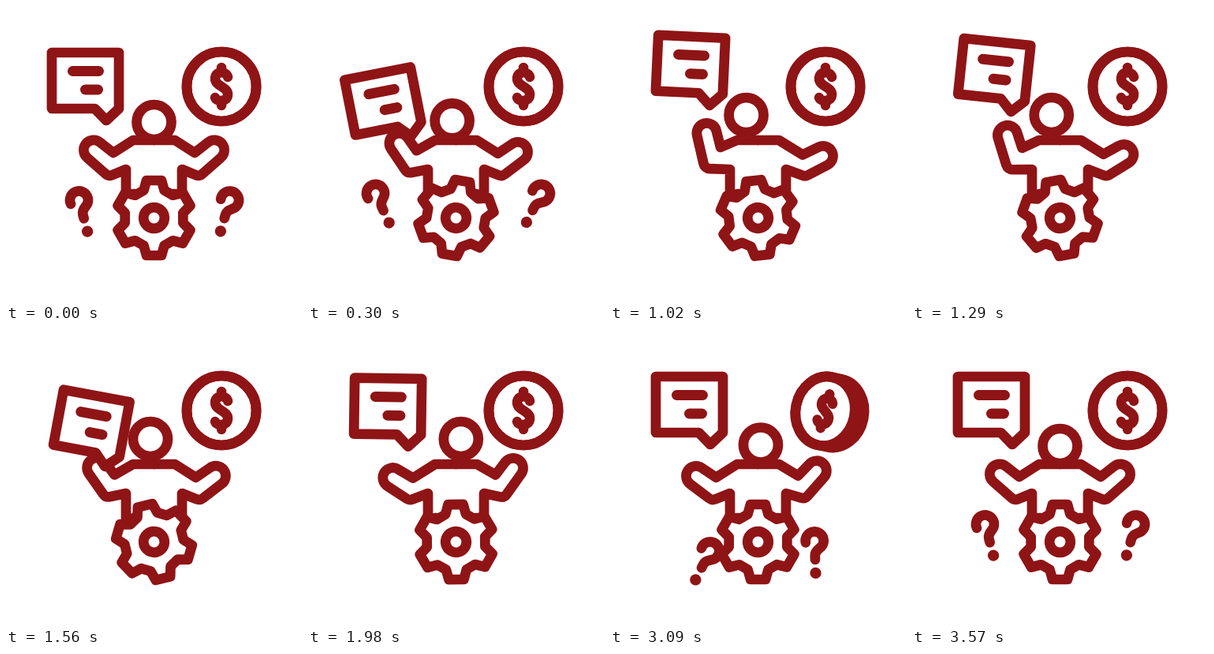
Write an HTML page with a canvas that moves like this. It is 375 px wide and 375 px high and loops after 3.6 s.

```html
<!DOCTYPE html>
<html>
<head>
<meta charset="utf-8">
<style>
html, body { margin: 0; width: 100%; height: 100%; overflow: hidden; background: #fff; }
canvas { display: block; }
</style>
</head>
<body>
<canvas id="stage" width="375" height="375"></canvas>
<script>
const ctx = document.getElementById('stage').getContext('2d');
const LOOP = 3600, RED = '#8f1416', RAD = Math.PI / 180, LINE = 12.7;

const mix = (a, b, k) => a.map((v, i) => v + (b[i] - v) * k);

// Smooth 0 to 1 between two times.
function ease(t, start, end) {
  const u = Math.min(1, Math.max(0, (t - start) / (end - start)));
  return u * u * (3 - 2 * u);
}

function ink(width = LINE, filled = false) {
  if (filled) ctx.fill();
  ctx.lineWidth = width;
  ctx.stroke();
}

function poly(points, closed) {
  ctx.beginPath();
  points.forEach(p => ctx.lineTo(...p));
  if (closed) ctx.closePath();
}

function circle(x, y, r) {
  ctx.beginPath();
  ctx.arc(x, y, r, 0, 2 * Math.PI);
}

function placed(x, y, degrees, draw) {
  ctx.save();
  ctx.translate(x, y);
  ctx.rotate(degrees * RAD);
  draw();
  ctx.restore();
}

function question(x, y, degrees, scale) {
  if (scale < 0.01) return;
  placed(x, y, degrees, () => {
    ctx.scale(scale, scale);
    ctx.beginPath();
    ctx.arc(0, 0, 11.5, 170 * RAD, 35 * RAD);
    ctx.bezierCurveTo(6, 11, 0, 12, 0, 19);
    ctx.lineTo(0, 24);
    ink();
    circle(0, 41, 0.8);
    ink();
  });
}

function questions(t) {
  const leaving = t < LOOP / 2;
  const out = leaving ? 1.18 * ease(t, 0, 800) : 0;
  const back = leaving ? 0 : 1 - ease(t, 2760, 3420);
  const scale = leaving ? 1 - ease(t, 690, 900) : ease(t, 2760, 2960);
  question(92.5 - 18.5 * out + 69 * back, 246 - 23 * out + 68 * back, -15 - 26 * out + 84 * back, scale);
  question(283.5 + 31.5 * out - 49 * back, 246 - 23 * out + 42 * back, 16.5 + 27.5 * out - 37 * back, scale);
}

// Each pose: hand, inner elbow, outer elbow.
const REST = [111, 182.5, 136, 186, 130, 216];
const RAISED = [122.5, 161, 140, 179, 120, 206];
const LOWERED = [104, 191.5, 130, 189, 127, 216];

function halfBody(lift) {
  const [hx, hy, ix, iy, ox, oy] = mix(REST, lift < 0 ? LOWERED : RAISED, Math.abs(lift));
  const dir = Math.atan2(hy - (iy + oy) / 2, hx - (ix + ox) / 2);
  ctx.beginPath();
  ctx.moveTo(187.5, 170);
  ctx.lineTo(161, 170);
  ctx.lineTo(ix, iy);
  ctx.arc(hx, hy, 12.6, dir + Math.PI / 2, dir - Math.PI / 2, true);
  ctx.arcTo(ox, oy, 152, 207, 8);
  ctx.lineTo(152, 207);
  ctx.lineTo(152, 241);
  ctx.lineTo(163, 238);
  ink();
}

function body(left, right) {
  ctx.fillRect(152, 170, 71, 70);
  halfBody(left);
  ctx.save();
  ctx.translate(375, 0);
  ctx.scale(-1, 1);
  halfBody(right);
  ctx.restore();
}

function gear(degrees) {
  placed(187.5, 268.5, degrees, () => {
    ctx.beginPath();
    for (let i = 0; i < 6; i++) {
      for (const [x, y] of [[-13, -35], [-9.5, -47.5], [9.5, -47.5], [13, -35]]) ctx.lineTo(x, y);
      ctx.rotate(60 * RAD);
    }
    ctx.closePath();
    ink(LINE, true);
    circle(0, 0, 13.3);
    ink();
  });
}

function coin(turn) {
  const r = 44, squash = Math.cos(turn * RAD), depth = 23 * Math.sin(turn * RAD);
  placed(273 - turn * 0.015, 102 + turn * 0.025, turn * turn / 86, () => {
    ctx.beginPath();
    ctx.ellipse(depth, 0, r * squash, r, 0, -Math.PI / 2, Math.PI / 2);
    ctx.ellipse(0, 0, r * squash, r, 0, Math.PI / 2, Math.PI * 1.5);
    ctx.closePath();
    ink(LINE, true);
    ctx.beginPath();
    ctx.ellipse(0, 0, r * squash, r, 0, 0, 2 * Math.PI);
    ink();
    // Squash the dollar's path but not its line width.
    ctx.save();
    ctx.rotate(turn * 0.1 * RAD);
    ctx.scale(squash, 1 - turn * 0.0024);
    ctx.beginPath();
    ctx.moveTo(0, -24);
    ctx.lineTo(0, -18);
    ctx.moveTo(8, -12);
    ctx.bezierCurveTo(6, -20, -8, -20, -8, -10);
    ctx.bezierCurveTo(-8, 0, 8, 0, 8, 10);
    ctx.bezierCurveTo(8, 20, -6, 20, -8, 14);
    ctx.moveTo(0, 18);
    ctx.lineTo(0, 24);
    ctx.restore();
    ink(12.5);
  });
}

function bubble(x, y, degrees) {
  placed(x, y, degrees, () => {
    poly([[-42.5, -35.5], [42.5, -35.5], [42.5, 35.5], [26.5, 50.5], [12, 35.5], [-42.5, 35.5]], true);
    ink(LINE, true);
    poly([[-16, -12], [17, -12]]);
    ink(13);
    poly([[0, 11.5], [16, 11.5]]);
    ink(13);
  });
}

// The bubble drops onto the hand, is tossed up, caught and put back: x, y, angle.
function bubblePose(t) {
  const rest = [100.5, 94.5, 0];
  let pose = mix(rest, [91.5, 136.5, -18], ease(t, 0, 520));
  pose = mix(pose, [103, 68.5, 4.6], ease(t, 520, 1130));
  pose = mix(pose, [108.8, 122.5, 11], ease(t, 1130, 1650));
  return mix(pose, rest, ease(t, 1650, 2050));
}

function draw(t) {
  ctx.fillStyle = '#fff';
  ctx.fillRect(0, 0, 375, 375);
  ctx.strokeStyle = RED;
  ctx.lineCap = ctx.lineJoin = 'round';

  // -1 leans left, 1 leans right
  const lean = 2 * ease(t, 820, 2650) - ease(t, 0, 820) - ease(t, 2650, 3280);
  const rise = ease(t, 0, 1100) - ease(t, 2500, 3300);

  questions(t);
  body(Math.min(1, -1.3 * lean), 0.9 * lean);
  circle(187.5 + 16 * lean, 147 - 9 * rise, 22);
  ink(LINE, true);
  gear(360 * (1 - (1 - Math.min(1, t / 3300) ** 2.1) ** 4.25));
  coin(64 * (ease(t, 2110, 2650) - ease(t, 2870, 3310)));
  bubble(...bubblePose(t));
}

function frame() {
  draw(performance.now() % LOOP);
  requestAnimationFrame(frame);
}
frame();
</script>
</body>
</html>
```
